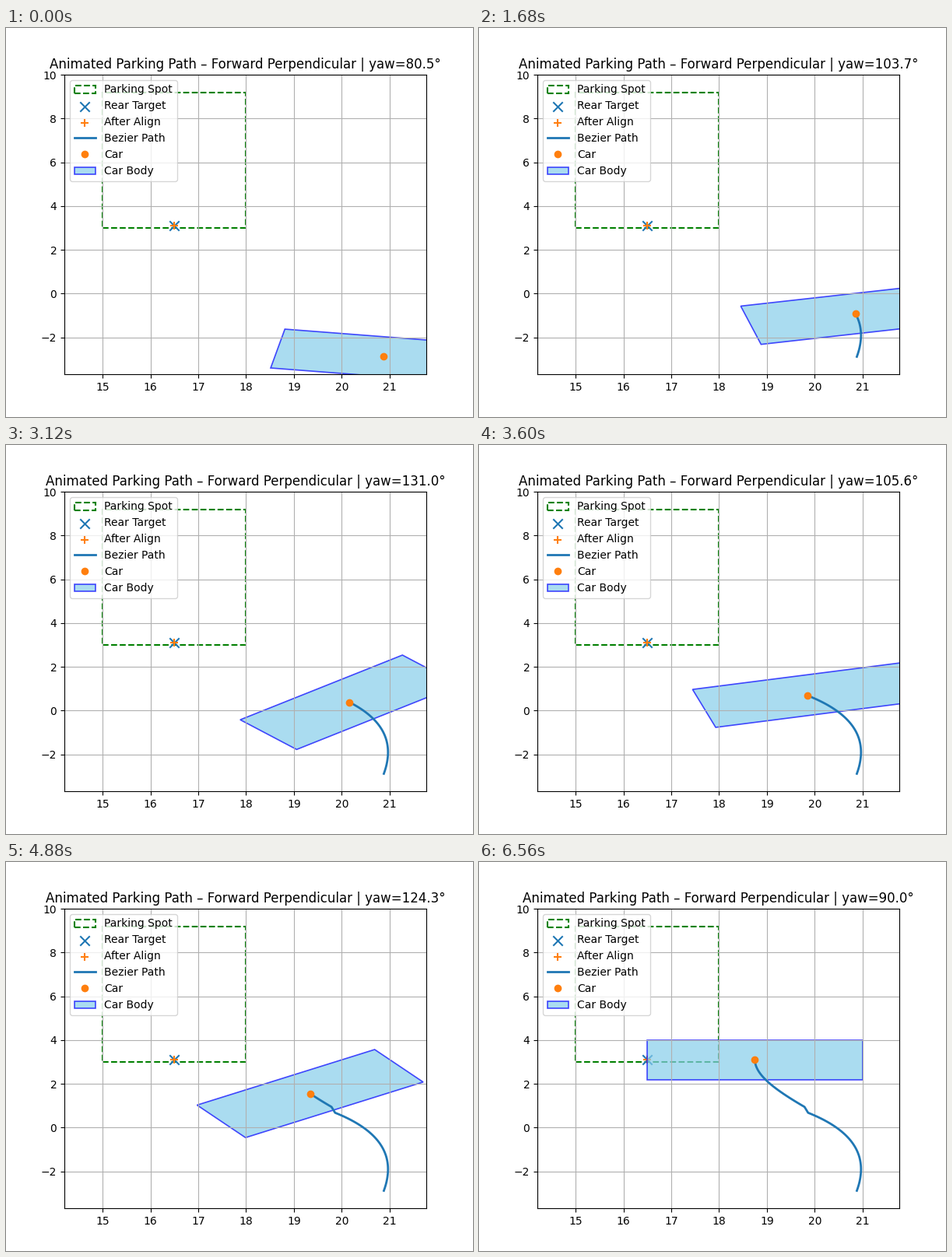
A matplotlib script that plays this animation: 600 px wide and 500 px high, repeating every 6.64 s.

```python
import numpy as np
import matplotlib.pyplot as plt
from matplotlib.animation import FuncAnimation
from matplotlib.patches import Polygon, Rectangle

LENGTH, WIDTH = 4.5, 1.8
CURVE_1, ALIGN, CURVE_2 = 44, 10, 28   # steps in each part of the route
STEP_MS = 80


def bezier(ctrl, steps):
    p0, p1, p2, p3 = np.array(ctrl)
    t = np.linspace(0, 1, steps + 1)[:, None]
    s = 1 - t
    return s**3 * p0 + 3 * s**2 * t * p1 + 3 * s * t**2 * p2 + t**3 * p3


def heading(vec):
    return np.degrees(np.arctan2(vec[..., 1], vec[..., 0]))


def make_route():
    start = np.array([20.882, -2.88])
    bend = start + [-1.02, 3.56]
    kink = bend + [-0.0748, 0.268]
    goal = np.array([18.75, 3.1])
    lead = np.array([0.261, 1.557])

    first = bezier([start, start + lead, bend - [-0.96, 0.837], bend], CURVE_1)
    shift = np.linspace(bend, kink, ALIGN + 1)
    last = bezier([kink, kink + [-0.677, 0.858], goal - [0, 0.643], goal], CURVE_2)
    pts = np.vstack([first, shift[1:], last[1:]])

    # Heading follows the last step; both ends use the exact tangent.
    yaw = np.empty(len(pts))
    yaw[1:] = heading(np.diff(pts, axis=0))
    yaw[0], yaw[-1] = heading(lead), 90.0
    return pts, yaw


def car_corners(center, yaw):
    a = np.radians(yaw - 90)
    rot = np.array([[np.cos(a), -np.sin(a)], [np.sin(a), np.cos(a)]])
    box = np.array([[-1, -1], [1, -1], [1, 1], [-1, 1]]) * [LENGTH / 2, WIDTH / 2]
    return box @ rot.T + center


route, yaws = make_route()

fig, ax = plt.subplots(figsize=(6, 5), dpi=100)
ax.set_xlim(14.2, 21.77)
ax.set_ylim(-3.68, 10)
ax.grid(True)

ax.add_patch(Rectangle((15, 3), 3, 6.2, fill=False, edgecolor="green",
                       linestyle="--", linewidth=1.5, label="Parking Spot"))
ax.scatter([16.5], [3.1], marker="x", s=80, color="C0", label="Rear Target")
ax.scatter([16.5], [3.1], marker="+", s=60, color="C1", label="After Align")
trail, = ax.plot([], [], color="C0", linewidth=2, label="Bezier Path")
car, = ax.plot([], [], "o", color="C1", label="Car")
body = Polygon(car_corners(route[0], yaws[0]), closed=True, facecolor="skyblue",
               edgecolor="blue", alpha=0.7, linewidth=1.2, label="Car Body")
ax.add_patch(body)
ax.legend(loc="upper left")
title = ax.set_title("")


def update(i):
    trail.set_data(route[:i + 1, 0], route[:i + 1, 1])
    car.set_data([route[i, 0]], [route[i, 1]])
    body.set_xy(car_corners(route[i], yaws[i]))
    title.set_text("Animated Parking Path – Forward Perpendicular"
                   f" | yaw={yaws[i]:.1f}°")
    return trail, car, body, title


anim = FuncAnimation(fig, update, frames=len(route), interval=STEP_MS,
                     init_func=lambda: update(0), repeat=True, repeat_delay=0)
plt.show()
```
